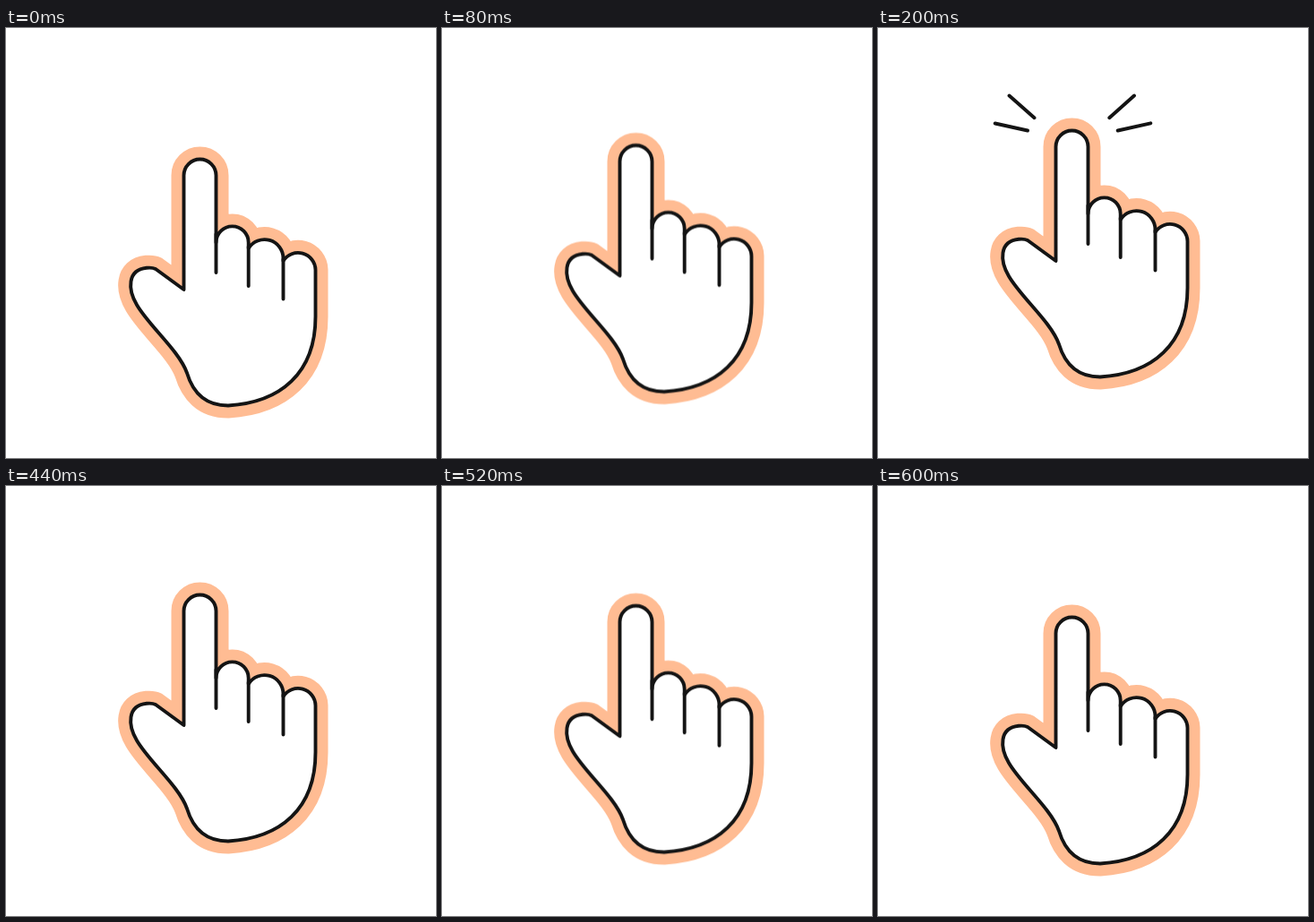
Recreate the animation shown at these times as an HTML page without scripts. Size 480x480 px, loop 2000 ms.

```html
<!DOCTYPE html>
<html lang="en">
<head>
<meta charset="utf-8">
<title>Tapping hand</title>
<style>
  html, body { margin: 0; width: 100%; height: 100%; overflow: hidden; background: #fff; }
  svg { display: block; width: 100vw; height: 100vh; }
  .ink { stroke: #141414; stroke-width: 3.9; }
  .halo { stroke: #ffbc93; stroke-width: 28; }
  .hand { animation: tap 2s step-end infinite; }
  .rays { visibility: hidden; animation: flash 2s step-end infinite; }

  /* 40 ms per 2% step: eased rise, hold, even fall */
  @keyframes tap {
    0% { transform: translateY(0); }
    2% { transform: translateY(-6.5px); }
    4% { transform: translateY(-15.5px); }
    6% { transform: translateY(-25px); }
    8% { transform: translateY(-30.5px); }
    10% { transform: translateY(-32px); }
    22% { transform: translateY(-25px); }
    24% { transform: translateY(-19px); }
    26% { transform: translateY(-12.8px); }
    28% { transform: translateY(-6.4px); }
    30%, 100% { transform: translateY(0); }
  }
  @keyframes flash {
    0% { visibility: hidden; }
    10% { visibility: visible; }
    22%, 100% { visibility: hidden; }
  }
</style>
</head>
<body>
<svg viewBox="0 0 480 480" fill="none" stroke-linecap="round" stroke-linejoin="round">
  <defs>
    <path id="outline" d="M198.5 292 V164.5 A18 18 0 0 1 234.5 164.5 V239.5
      A18.1 18.1 0 0 1 270.7 239.5 V246
      A21 21 0 0 1 309.5 257.3 V260
      A19.5 19.5 0 0 1 345.5 270 V322
      C345.5 386 306 418 248 421.5
      C221 421.5 208 405 202 385
      C193 360 160 333 146 309
      C136 292 135 270 157 267.8
      C161 267.4 164 267.5 167 269 Z"/>
  </defs>
  <g class="hand">
    <use href="#outline" class="halo"/>
    <use href="#outline" class="ink" fill="#fff"/>
    <path class="ink" d="M234.5 230 V273 M270.7 244 V288 M309.5 258 V302.5"/>
  </g>
  <path class="ink rays" d="M146.5 75.5 L174.5 100.3 M130.7 106.5 L167 114.5
    M286 75.5 L258.3 100.3 M304.3 106.3 L267.7 114.5"/>
</svg>
</body>
</html>
```
